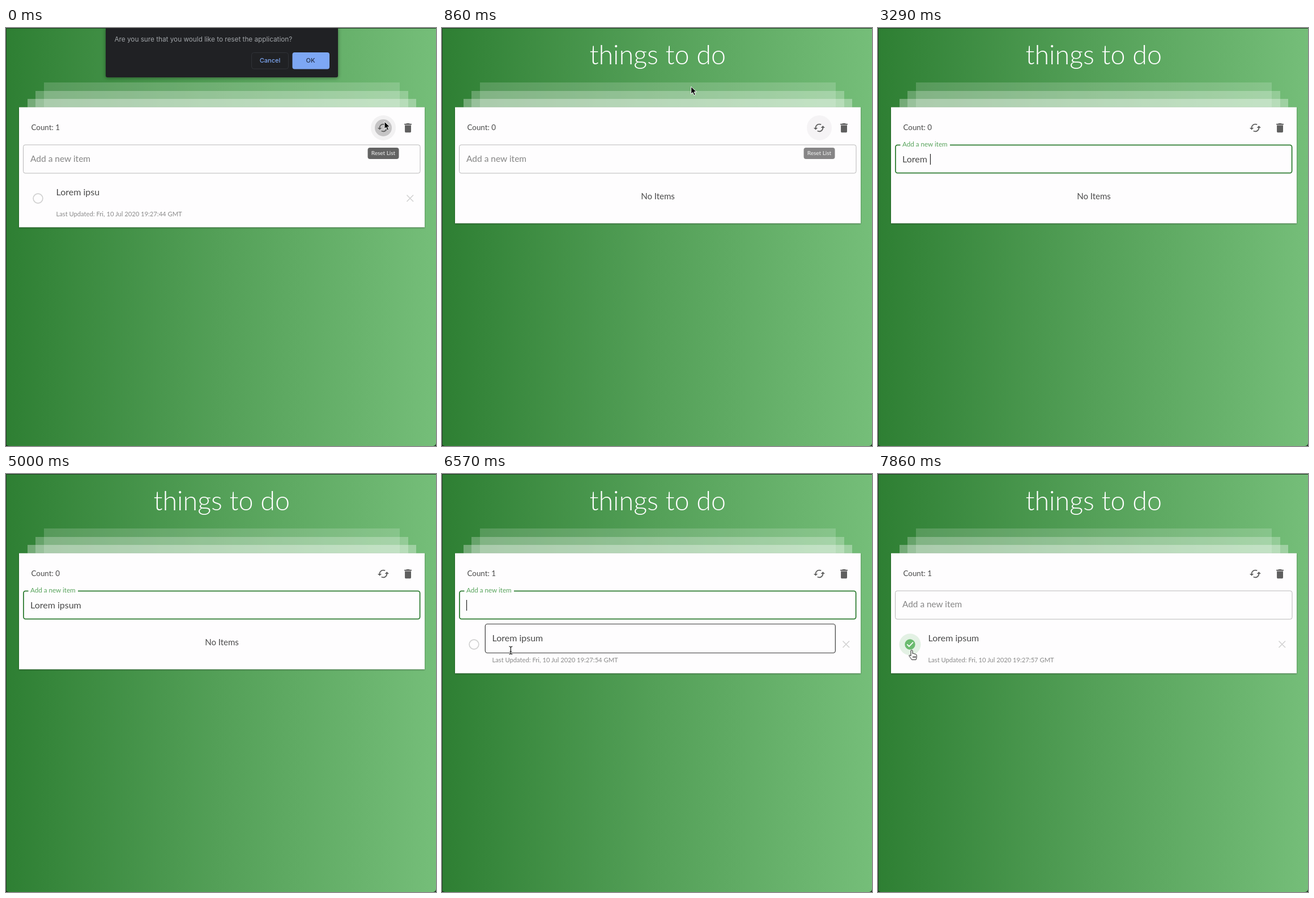
An HTML page that plays this animation: 759x737 px, repeating every 8 s.

```html
<!DOCTYPE html>
<html lang="en">
<head>
<meta charset="utf-8">
<title>Things to do</title>
<style>
  html, body { margin: 0; width: 100%; height: 100%; overflow: hidden; background: #16281a; }
  svg { display: block; width: 759px; height: 737px; border-radius: 0 0 5px 5px; }
  text { font-family: Lato, "Open Sans", sans-serif; fill: #4a4a4a; white-space: pre; }
  .mid { text-anchor: middle; }
  #title { font-size: 46.7px; font-weight: 300; fill: #fff; }
  #count { font-size: 13.4px; }
  #empty { font-size: 15px; }
  #label { font-size: 15.5px; }
  #typed, #name { font-size: 16px; }
  #stamp { font-size: 11.2px; fill: #8a8a8a; }
  #tip text { font-size: 10px; fill: #f2f2f2; }
  #dialog text { font: 500 11px Inter, Roboto, sans-serif; fill: #7fa9f6; }
  #dialog .ask { font-size: 11.75px; font-weight: 400; fill: #a0a4a8; }
  #dialog .ok { fill: #24304a; }
</style>
</head>
<body>
<svg viewBox="0 0 759 737">
  <defs>
    <linearGradient id="green">
      <stop offset="0" stop-color="#2e7f33"/>
      <stop offset=".5" stop-color="#54a058"/>
      <stop offset="1" stop-color="#75be79"/>
    </linearGradient>
  </defs>
  <rect width="759" height="737" fill="url(#green)"/>
  <path d="M0 .5H759M.5 0V737" stroke="#1d3d22"/>
  <text id="title" class="mid" x="380.7" y="64">things to do</text>

  <g fill="#fff">
    <rect x="67" y="96" width="628" height="44" opacity=".17"/>
    <rect x="52" y="111" width="658" height="29" opacity=".25"/>
    <rect x="38" y="125" width="686" height="15" opacity=".32"/>
  </g>
  <rect id="card" x="23" y="139.7" width="716" fill="#fefdfe" style="filter:drop-shadow(0 1px 1px #0006)"/>

  <text id="count" x="44.5" y="180"></text>
  <circle id="halo" cx="666" cy="176" r="22" fill="#f2f1f2"/>
  <circle id="pulse" cx="666" cy="176" r="15" fill="#c5c4c5"/>
  <g fill="#5f5f5f">
    <path transform="translate(655 165) scale(.91)" d="M19 8l-4 4h3c0 3.31-2.69 6-6 6-1.01 0-1.97-.25-2.8-.7l-1.46 1.46C8.97 19.54 10.43 20 12 20c4.42 0 8-3.58 8-8h3zM6 12c0-3.31 2.69-6 6-6 1.01 0 1.97.25 2.8.7l1.46-1.46C15.03 4.46 13.57 4 12 4c-4.42 0-8 3.58-8 8H1l4 4 4-4z"/>
    <path transform="translate(698.6 165.2) scale(.91)" d="M6 19c0 1.1.9 2 2 2h8c1.1 0 2-.9 2-2V7H6zM19 4h-3.5l-1-1h-5l-1 1H5v2h14z"/>
  </g>

  <rect id="field" rx="3.5" fill="none"/>
  <rect id="notch" x="39.5" y="203" width="87.5" height="6" fill="#fefdfe"/>
  <text id="label">Add a new item</text>
  <text id="typed" x="43" y="236.5"></text>
  <path id="caret" d="M.5 222v19" stroke="#222" stroke-width="1.2"/>
  <text id="empty" class="mid" x="381" y="301.5">No Items</text>

  <g id="item">
    <rect id="outline" x="76.3" y="264.5" width="618" height="51" rx="4" fill="none" stroke="#3a3a3a" stroke-width="1.2"/>
    <circle id="ring" cx="56.5" cy="300.5" r="19"/>
    <circle id="box" cx="56.5" cy="300.5" r="8.4" stroke-width="1.6"/>
    <path id="tick" d="M51.3 300.3l3.6 3.6 7.1-7.2" fill="none" stroke="#fff" stroke-width="1.8"/>
    <text id="name" x="88.5" y="295"></text>
    <text id="stamp" x="88.5" y="331.5"></text>
    <path d="M707.5 294.5l11.5 11.5m0-11.5l-11.5 11.5" stroke="#d2d2d2" stroke-width="1.6"/>
  </g>

  <g id="tip">
    <rect x="638.5" y="211" width="55" height="20" rx="4" fill="#636363"/>
    <text class="mid" x="666" y="224.3">Reset List</text>
  </g>

  <g id="dialog">
    <path d="M176 0H586V84q0 3-3 3H179q-3 0-3-3z" fill="#202124" style="filter:drop-shadow(0 1px 3px #0006)"/>
    <text class="ask" x="191.5" y="23.5">Are you sure that you would like to reset the application?</text>
    <rect x="433.5" y="43.5" width="65" height="28.5" rx="4" fill="none" stroke="#303338"/>
    <text class="mid" x="466" y="61.3">Cancel</text>
    <rect x="505.5" y="43" width="65.5" height="29.5" rx="4" fill="#7da7f4"/>
    <text class="mid ok" x="537.5" y="61.3">OK</text>
  </g>

  <g id="cursor" stroke-linejoin="round">
    <path id="arrow" d="M0 0v13l3-2.8 2.2 5.2 2.4-1-2.2-5.1h4.2z" fill="#000" stroke="#fff"/>
    <g id="beam" fill="none">
      <path d="M-3-7q3 0 3 2.5q0-2.5 3-2.5M0-5V5M-3 7q3 0 3-2.5q0 2.5 3 2.5M-2 2h4" stroke="#fff" stroke-width="2.6"/>
      <path d="M-3-7q3 0 3 2.5q0-2.5 3-2.5M0-5V5M-3 7q3 0 3-2.5q0 2.5 3 2.5M-2 2h4" stroke="#111" stroke-width="1.2"/>
    </g>
    <path id="hand" d="M-1.5 1q0-1.5 1.4-1.5T1.5 1V5.500q2.200-1 2.700.7q2.200-.7 2.500.8q2-.2 2 1.600v3.400q0 1.500-1.200 4.500H0q-1-2.500-3.500-5q-2-2.500-.8-3q1.300-.4 2.800 1.500zM2.500 10v3.500M4.600 10v3.500M6.600 10v3.500" fill="#fff" stroke="#222"/>
  </g>
</svg>
<script>
const LOOP = 8000, FPS = 7;
const RESET = 500, FOCUS = 1295, ENTER = 5210, BLUR = 7690, CHECK = 7800;
const PHRASE = "Lorem ipsum";
const KEYS = [2400, 2550, 2700, 2850, 3000, 3280, 3560, 3700, 3990, 4130, 4420];
// pointer stops: time, x, y
const STOPS = [[100, 668, 165], [480, 525, 44], [600, 525, 44], [1290, 252.5, 233.5],
  [5950, 252.5, 233.5], [6560, 121.5, 311], [6950, 59, 307], [7500, 59, 307], [7800, 59.5, 311]];

const el = {};
document.querySelectorAll("[id]").forEach(e => el[e.id] = e);
const set = (id, attrs) => { for (const k in attrs) el[id].setAttribute(k, attrs[k]); };
const show = (id, on) => set(id, { opacity: +on });
const clamp = v => Math.max(0, Math.min(1, v));
const easeOut = v => 1 - (1 - clamp(v)) ** 2;
const mix = (a, b, p) => a + (b - a) * p;

function pointer(t) {
  const i = STOPS.findIndex(s => s[0] > t);
  if (i < 0) return STOPS[STOPS.length - 1].slice(1);
  if (i === 0) return STOPS[0].slice(1);
  const [t0, x0, y0] = STOPS[i - 1], [t1, x1, y1] = STOPS[i];
  const u = (t - t0) / (t1 - t0), p = u * u * (3 - 2 * u);
  return [mix(x0, x1, p), mix(y0, y1, p)];
}

// border drawn inside the field's outer edge
function border(width, stroke) {
  set("field", {
    x: 30 + width / 2, y: 205.5 + width / 2, width: 701.5 - width, height: 51 - width,
    stroke, "stroke-width": width
  });
}

function draw(t) {
  const before = t < RESET, added = t >= ENTER, hasItem = before || added;
  const checked = t >= CHECK, focused = t >= FOCUS && t < BLUR;
  const [x, y] = pointer(t);
  const inside = (l, top, r, b) => x > l && x < r && y > top && y < b;
  const overField = inside(30, 206, 731, 257);
  const overItem = added && inside(76, 264, 695, 316);
  const overBox = added && Math.hypot(x - 56.5, y - 300.5) < 19;

  set("card", { height: hasItem ? 211.7 : 204.7 });
  el.count.textContent = "Count: " + +hasItem;
  show("empty", !hasItem);
  show("item", hasItem);
  el.name.textContent = before ? "Lorem ipsu" : PHRASE;
  el.stamp.textContent = `Last Updated: Fri, 10 Jul 2020 19:27:${before ? 44 : checked ? 57 : 54} GMT`;
  show("outline", overItem);
  show("ring", overBox);
  set("ring", { fill: checked ? "#e3f1e4" : "#f3f2f3" });
  set("box", { fill: checked ? "#6bbb6f" : "none", stroke: checked ? "#6bbb6f" : "#cfcfcf" });
  show("tick", checked);

  // reset button and dialog
  show("pulse", before);
  const hover = 1 - clamp((t - 800) / 250);
  set("halo", { opacity: hover });
  set("tip", { opacity: hover });
  const out = clamp((t - 540) / 200);
  set("dialog", {
    opacity: 1 - out ** 1.6,
    transform: `translate(${381 * .016 * out} ${-19 * out}) scale(${1 - .016 * out})`
  });

  // text field
  const lift = t < BLUR ? easeOut((t - FOCUS) / 200) : 1 - easeOut((t - BLUR) / 200);
  border(focused ? 1.8 : 1, focused ? "#2e7d32" : overField ? "#444" : "#b8b8b8");
  show("notch", focused);
  set("label", { transform: `translate(43 ${mix(235.5, 209, lift)}) scale(${mix(1, .752, lift)})` });
  el.label.style.fill = focused ? "#57a35b" : "#858585";
  const typed = added ? "" : PHRASE.slice(0, KEYS.filter(k => k <= t).length);
  el.typed.textContent = typed;
  const last = Math.max(...[FOCUS, ...KEYS, ENTER].filter(k => k <= t));
  show("caret", focused && (t - last) % 1000 < 500);
  const end = typed ? el.typed.getComputedTextLength() + 1 : 0;
  set("caret", { transform: `translate(${43 + Math.round(end)} 0)` });

  show("cursor", t < KEYS[0] || t > 5950);
  set("cursor", { transform: `translate(${x} ${y})` });
  const beam = overField || overItem;
  show("beam", beam);
  show("hand", overBox);
  show("arrow", !beam && !overBox);
}

function tick() {
  const step = Math.floor((performance.now() % LOOP + 5) * FPS / 1000) % (LOOP * FPS / 1000);
  draw(step * 1000 / FPS);
  requestAnimationFrame(tick);
}
tick();
</script>
</body>
</html>
```
